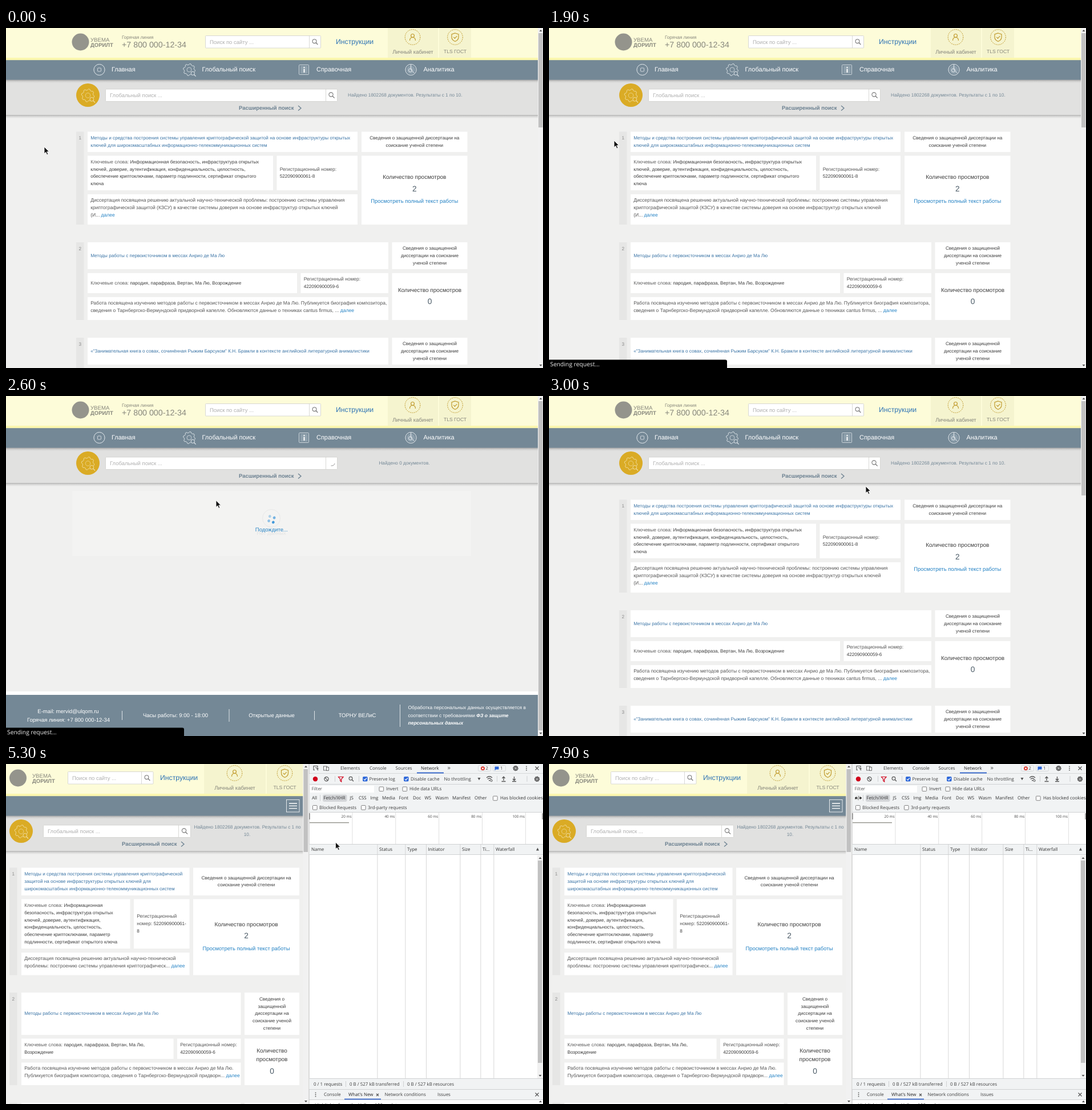
Recreate the animation shown at these times as an HTML page. Size 941x595 px, loop 8000 ms.

```html
<!DOCTYPE html>
<html lang="ru">
<head>
<meta charset="utf-8">
<title>Поиск</title>
<style>
html, body { margin: 0; width: 100%; height: 100%; overflow: hidden; background: #f0f0ef; }
svg { display: block; }
text { font-family: "Liberation Sans", Arial, sans-serif; white-space: pre; text-rendering: geometricPrecision; }
.mid { text-anchor: middle; }
.end { text-anchor: end; }
.bold { font-weight: bold; }
.slant { font-weight: bold; font-style: italic; }
.dev text { font-family: "Open Sans", "Noto Sans", sans-serif; }
</style>
</head>
<body>
<svg id="stage" width="941" height="595" viewBox="0 0 941 595"></svg>
<script>
const BLUE = '#2482c4', SLATE = '#748896', INK = '#3c3c3c', GREY = '#86867c', GOLD = '#c09a2c', BAR = '#f1f3f4', TAB = '#2b5fc9';
const PHONE = '+7 800 000-12-34';

const box = (x, y, x2, y2, fill, more = '') =>
  `<rect x="${x}" y="${y}" width="${x2 - x}" height="${y2 - y}" fill="${fill}" ${more}/>`;
const frame = (x, y, x2, y2, stroke, fill = 'none', r = 0) =>
  box(x + .5, y + .5, x2 - .5, y2 - .5, fill, `stroke="${stroke}" stroke-width=".8" rx="${r}"`);
const line = (d, stroke, width = 1, fill = 'none', more = '') =>
  `<path d="${d}" stroke="${stroke}" stroke-width="${width}" fill="${fill}" ${more}/>`;
const disc = (x, y, r, fill, more = '') => `<circle cx="${x}" cy="${y}" r="${r}" fill="${fill}" ${more}/>`;
const ring = (x, y, r, stroke, width = 1, more = '') =>
  disc(x, y, r, 'none', `stroke="${stroke}" stroke-width="${width}" ${more}`);
// y is the middle of the line of text
const text = (x, y, s, size = 8.17, fill = INK, cls = '') =>
  `<text x="${x}" y="${(y + size * .32).toFixed(2)}" font-size="${size}" fill="${fill}" class="${cls}">${s}</text>`;
const span = (s, fill, size = 8.3) => `<tspan fill="${fill}" font-size="${size}">${s}</tspan>`;
const group = (id, body, more = '') => `<g id="${id}" ${more}>${body}</g>`;

const lens = (x, y, r, color, width = 1.1) => ring(x, y, r, color, width) +
  line(`M${x + r * .7} ${y + r * .7}l${r} ${r}`, color, width * 1.2);
const cog = (x, y, r, color, teeth = 8, width = 1) => {
  let d = '';
  for (let i = 0; i < teeth * 4; i++) {
    const a = (i + .5) * Math.PI / teeth / 2, q = i % 4 < 2 ? r : r * .83;
    d += `${i ? 'L' : 'M'}${(x + q * Math.cos(a)).toFixed(1)} ${(y + q * Math.sin(a)).toFixed(1)}`;
  }
  return line(d + 'Z', color, width, 'none', 'stroke-linejoin="round"');
};
const cogLens = (x, y, r, color, back) => cog(x, y, r, color, 8, .9) + ring(x, y, r * .38, color, .7) +
  disc(x + r * .6, y + r * .6, r * .38, back) + lens(x + r * .6, y + r * .6, r * .3, color, 1);

function searchField(x, split, x2, y, hint) {
  return frame(x, y, x2, y + 22.5, '#d0d0cc', '#fff', 1) + box(split, y, split + .8, y + 22, '#d0d0cc') +
    text(x + 8, y + 11.5, hint, 9.5, '#b0b0b0');
}

function header(p) {
  const [ax, tx] = [p.account[2], p.tls[2]];
  return box(0, 0, p.w, 595, '#f0f0ef') + box(0, 0, p.w, 53, '#fdfcd9') + box(0, 52, p.w, 57, '#fbf7ae') +
    disc(p.logo, 24.5, 15, '#94948c') +
    text(p.name, 20.5, 'УВЕМА', 9.6, GREY) + text(p.name, 30, 'ДОРИЛТ', 9.5, GREY, 'bold') +
    searchField(p.site[0], p.site[1], p.site[2], 13, 'Поиск по сайту ...') +
    lens(p.site[1] + 9.5, 23.2, 3.4, '#777') +
    text(p.help, 24, 'Инструкции', 12.25, '#2f74b5') +
    box(p.account[0], 0, p.account[1], 52, '#f5f4cf') + box(p.tls[0], 0, p.tls[1], 52, '#f5f4cf') +
    [ax, tx].map(x => ring(x, 16, 13.3, GOLD, 1, 'stroke-dasharray="2 1.3"')).join('') +
    ring(ax, 13.4, 2.9, GOLD, 1.2) + line(`M${ax - 5} 22q0-5.5 5-5.5t5 5.5`, GOLD, 1.2) +
    line(`M${tx} 9l6 2v5q0 5-6 7.5q-6-2.5-6-7.5v-5zM${tx - 2.8} 15.8l2.2 2.3 3.8-4`, GOLD, 1.2) +
    text(ax + .5, 41.7, 'Личный кабинет', 9.5, GREY, 'mid') + text(tx, 41.5, 'TLS ГОСТ', 8.6, GREY, 'mid') +
    box(0, 90.5, p.w, 152.3, '#e1e1e0') + box(0, 56.2, p.w, 90.7, SLATE) +
    box(0, 90.7, p.w, 96, 'url(#shade)') + box(0, 152.3, p.w, 158.5, 'url(#shade)') +
    disc(p.badge, 117.5, 20.5, '#daab25') + cogLens(p.badge, 118, 11.3, '#f2dfa4', '#daab25') +
    searchField(p.find[0], p.find[1], p.find[2], 106.5, 'Глобальный поиск ...') +
    text(p.more, 140.3, 'Расширенный поиск', 9.45, '#6b8090', 'bold') +
    line(`M${p.more + 104} 136l5 4.3-5 4.3`, '#6b8090', 1.3);
}

const scrollbar = (x, y, y2, from, to) => box(x, y, x + 9.5, y2, '#f1f1f1') + box(x + 1, from, x + 8.5, to, '#c1c1c1') +
  line(`M${x + 2.5} ${y + 6}l2.5-3 2.5 3zM${x + 2.5} ${y2 - 6}l2.5 3 2.5-3z`, 'none', 0, '#505050');

// Text block centred vertically in a white card
function card(x, y, x2, y2, lines, { fill = INK, mid = false, dy = 0, size } = {}) {
  const top = (y + y2) / 2 + dy - .3 - (lines.length - 1) * 6.4;
  return box(x, y, x2, y2, '#fff') + lines.map((s, i) =>
    text(mid ? (x + x2) / 2 : x + 5.2, top + i * 12.8, s, size, fill, mid ? 'mid' : '')).join('');
}
const title = (x, y, x2, y2, lines) => card(x, y, x2, y2, lines, { fill: '#3973a5' });
const kind = (x, y, x2, y2, lines) => card(x, y, x2, y2, lines, { mid: true });
const summary = (x, y, x2, y2, lines) => card(x, y, x2, y2, lines, { dy: -2.8, size: 8.53, fill: '#555' });
const index = (x, y, y2, n) => box(x, y, x + 13.5, y2, '#e6e6e5') + text(x + 6.8, y + 11, n, 8.2, '#888', 'mid');
function views(x, y, x2, y2, rows) {
  const c = (x + x2) / 2;
  return box(x, y, x2, y2, '#fff') + rows.map(([dy, s, size, fill]) =>
    text(c, (y + y2) / 2 + dy, s, size, fill, 'mid')).join('');
}
const label = s => span(s, '#5c5c5c');
const regLabel = s => span(s, '#555', 8.5);
const more = span('далее', BLUE, 8.53);
const keys = label('Ключевые слова: ');
const viewRows = [[-22.7, 'Количество просмотров', 10, INK], [-2, '2', 13.7, '#4a5a66'],
  [19.5, 'Просмотреть полный текст работы', 9.45, BLUE]];

const wideHead = header({
  w: 932, logo: 130.5, name: 148, site: [349, 531, 552], help: 578, account: [669, 757, 712.5],
  tls: [759, 815, 787], badge: 143.5, find: [174, 560, 581], more: 408
}) + text(203, 16.5, 'Горячая линия', 8.15, GREY) + text(203, 29.5, PHONE, 14.25, GREY) +
  ring(163.5, 73, 9.6, '#e3e9ed') + frame(160, 69.5, 167, 76.5, '#e3e9ed', 'none', 1) +
  cogLens(321, 73, 10.5, '#e3e9ed', SLATE) +
  frame(513, 64, 531, 82, '#e3e9ed', 'none', 1) + box(516, 66.5, 528.5, 79.5, '#8fa1ad') +
  box(521.5, 71.5, 523.5, 78, '#fff') + box(521.5, 68, 523.5, 70, '#fff') +
  ring(709.5, 73, 9.6, '#e3e9ed') + disc(709.5, 73, 7.3, '#8d9fac') + line('M709.5 64v9l6 6', '#e3e9ed') +
  ring(708.5, 74, 3, '#e3e9ed') +
  [[185, 'Главная'], [343.5, 'Глобальный поиск'], [544, 'Справочная'], [731.5, 'Аналитика']]
    .map(([x, s]) => text(x, 72.7, s, 10.95, '#fff')).join('');

const wideResults = text(599, 117, 'Найдено 1802268 документов. Результаты с 1 по 10.', 8.23, SLATE) +
  lens(569.5, 116.5, 3.6, '#777') + scrollbar(932, 0, 595, 9, 174) +
  index(123, 181.5, 344, 1) +
  title(143, 181.5, 616, 217, ['Методы и средства построения системы управления криптографической защитой на основе инфраструктуры открытых',
    'ключей для широкомасштабных информационно-телекоммуникационных систем']) +
  kind(623, 181.5, 808.5, 217, ['Сведения о защищенной диссертации на', 'соискание ученой степени']) +
  card(143, 223.5, 468, 284, [keys + 'Информационная безопасность, инфраструктура открытых',
    'ключей, доверие, аутентификация, конфиденциальность, целостность,',
    'обеспечение криптоключами, параметр подлинности, сертификат открытого', 'ключа']) +
  card(474.5, 223.5, 616, 284, [regLabel('Регистрационный номер:'), '522090900061-8']) +
  views(623, 223.5, 808.5, 344, viewRows) +
  summary(143, 291, 616, 344, ['Диссертация посвящена решению актуальной научно-технической проблемы: построению системы управления',
    'криптографической защитой (КЗСУ) в качестве системы доверия на основе инфраструктур открытых ключей',
    '(И... ' + more]) +
  index(123, 375, 511, 2) +
  title(143, 375, 670, 422, ['Методы работы с первоисточником в мессах Анрио де Ма Лю']) +
  kind(676.5, 375, 808.5, 422, ['Сведения о защищенной', 'диссертации на соискание', 'ученой степени']) +
  card(143, 429, 510, 464, [keys + 'пародия, парафраза, Вертан, Ма Лю, Возрождение']) +
  card(516.5, 429, 670, 464, [regLabel('Регистрационный номер:'), '422090900059-6']) +
  views(676.5, 429, 808.5, 511, [[-11.5, 'Количество просмотров', 10, INK], [9, '0', 13.7, '#4a5a66']]) +
  summary(143, 471, 670, 511, ['Работа посвящена изучению методов работы с первоисточником в мессах Анрио де Ма Лю. Публикуется биография композитора,',
    'сведения о Тарнбергско-Вермундской придворной капелле. Обновляются данные о техниках cantus firmus, ... ' + more]) +
  index(123, 542, 595, 3) +
  title(143, 542, 670, 589, ['«"Занимательная книга о совах, сочинённая Рыжим Барсуком" К.Н. Брамли в контексте английской литературной анималистики']) +
  kind(676.5, 542, 808.5, 589, ['Сведения о защищенной', 'диссертации на соискание', 'ученой степени']);

const dots = [[6, 0, .9], [0, 5.5, .5], [-6, 0, .35], [0, -5.5, .65]]
  .map(([x, y, o]) => disc(x, y, 2.4, '#2f8fd8', `opacity="${o}"`)).join('');
const waiting = text(698, 117, 'Найдено 0 документов.', 8.2, SLATE, 'mid') + scrollbar(932, 0, 595, 9, 585) +
  line('M576 118q-1 4.5-6.5 4', '#999') +
  box(116, 166, 815, 280, '#f3f3f2') + ring(465, 214, 15.5, '#e8e8e8') +
  text(465, 240, 'Нет данных', 9.5, '#e4e4e4', 'mid') + group('spinner', dots) +
  text(465.3, 234, 'Подождите...', 9.45, BLUE, 'mid') +
  box(0, 517, 932, 523, '#fff') + box(0, 523, 932, 595, SLATE) +
  [[109, 551.5, 'E-mail: mervid@ulqom.ru'], [109.5, 566.5, 'Горячая линия: ' + PHONE], [297, 559, 'Часы работы: 9:00 - 18:00'],
    [465.5, 559, 'Открытые данные'], [615.5, 559, 'ТОРНУ ВЕЛиС']].map(([x, y, s]) => text(x, y, s, 9.5, '#fff', 'mid')).join('') +
  line('M203.5 551v16M391 548v22M540.5 551v16M690.5 540v39', '#dde3e7') +
  text(704.5, 545.3, 'Обработка персональных данных осуществляется в', 8.47, '#fff') +
  text(704.5, 558.8, 'соответствии с требованиями <tspan class="slant">ФЗ о защите</tspan>', 8.47, '#fff') +
  text(704.5, 572, 'персональных данных', 8.47, '#fff', 'slant');

const narrow = header({
  w: 520.5, logo: 21, name: 46, site: [108, 237, 258.5], help: 270, account: [347, 455, 400.5],
  tls: [457, 520.5, 488.5], badge: 26.5, find: [65, 302, 324], more: 203
}) + lens(312, 116.5, 3.6, '#777') + frame(491, 62, 514.5, 84.5, '#fff') +
  line('M496 69h14M496 73.3h14M496 77.6h14', '#fff', 1.3) +
  text(423, 110.5, 'Найдено 1802268 документов. Результаты с 1 по', 8.23, SLATE, 'mid') + text(422.5, 123, '10.', 8.23, SLATE, 'mid') +
  index(6, 181.5, 369.5, 1) +
  title(27, 181.5, 321.5, 230, ['Методы и средства построения системы управления криптографической',
    'защитой на основе инфраструктуры открытых ключей для', 'широкомасштабных информационно-телекоммуникационных систем']) +
  kind(328, 181.5, 514, 230, ['Сведения о защищенной диссертации на', 'соискание ученой степени']) +
  card(27, 236.5, 217.5, 323, [keys + 'Информационная', 'безопасность, инфраструктура открытых', 'ключей, доверие, аутентификация,',
    'конфиденциальность, целостность,', 'обеспечение криптоключами, параметр', 'подлинности, сертификат открытого ключа']) +
  card(224, 236.5, 321.5, 323, [regLabel('Регистрационный'), regLabel('номер: ') + '522090900061-', '8']) +
  views(328, 236.5, 514, 369.5, viewRows) +
  summary(27, 330, 321.5, 369.5, ['Диссертация посвящена решению актуальной научно-технической', 'проблемы: построению системы управления криптографическ... ' + more]) +
  index(6, 400, 562, 2) +
  title(27, 400, 411.5, 474, ['Методы работы с первоисточником в мессах Анрио де Ма Лю']) +
  kind(418, 400, 514, 474, ['Сведения о', 'защищенной', 'диссертации на', 'соискание ученой', 'степени']) +
  card(27, 480.5, 293.5, 516, [keys + 'пародия, парафраза, Вертан, Ма Лю,', 'Возрождение']) +
  card(300, 480.5, 411.5, 516, [regLabel('Регистрационный номер:'), '422090900059-6']) +
  views(418, 480.5, 514, 562, [[-19.5, 'Количество', 10, INK], [-4.5, 'просмотров', 10, INK], [16.5, '0', 13.7, '#4a5a66']]) +
  summary(27, 522.5, 411.5, 562, ['Работа посвящена изучению методов работы с первоисточником в мессах Анрио де Ма Лю.',
    'Публикуется биография композитора, сведения о Тарнбергско-Вермундской придворн... ' + more]) +
  box(6, 593, 19.5, 595, '#e6e6e5') + box(27, 593, 411.5, 595, '#fff') + box(418, 593, 514, 595, '#fff') +
  scrollbar(520.5, 0, 595, 9, 154);

const dev = (x, y, s, fill = '#3c3c3c', size = 7.95, cls = '') => text(x, y, s, size, fill, cls);
const row = (y, items, fill) => items.map(([x, s]) => dev(x, y, s, fill)).join('');
const kebab = (x, y) => [-3.2, 0, 3.2].map(d => disc(x, y + d, .9, '#555')).join('');
const cross = (x, y, r = 3, color = '#555') => line(`M${x - r} ${y - r}l${2 * r} ${2 * r}m0-${2 * r}l-${2 * r} ${2 * r}`, color, 1.2);
const gear = (x, y) => cog(x, y, 4, '#555', 8, 1.5) + ring(x, y, 1.8, '#555', 1.3);
const check = (x, y, on) => frame(x, y - 4.3, x + 8.6, y + 4.3, on ? '#2b66d9' : '#666', on ? '#2b66d9' : '#fff', 1) +
  (on ? line(`M${x + 2} ${y}l1.8 2 3-4`, '#fff', 1.2) : '');

const devBase = box(530.5, 0, 941, 595, '#fff') + box(531, 0, 941, 16.5, BAR) + box(531, 16, 941, 16.8, '#cfd1d3') +
  line('M541 10.5h-2v-7h7v3M542 6l5 2-2 1 2 2', '#555', 1.1) +
  frame(556, 3.5, 563, 11.5, '#555') + frame(561, 5, 566, 12, '#555', BAR) +
  row(7.3, [[586, 'Elements'], [637, 'Console'], [682.5, 'Sources']]) + gear(893, 7.5) + kebab(912, 7.5) + cross(930.5, 7.5) +
  box(531, 569.5, 941, 587.5, BAR) + line('M531 569.5h410M531 587.5h410', '#cfd1d3') +
  kebab(542.5, 578.5) + row(578.5, [[557, 'Console'], [663.5, 'Network conditions'], [756, 'Issues']]) +
  dev(600, 578.5, "What's New", '#222') + cross(651, 579, 2) + box(593, 585.7, 657, 587.3, TAB) + cross(930.5, 578.5) +
  dev(541, 597.5, 'Highlights from the Vellum 100 update', '#333', 8.3) +
  line('M934 592l2.5-3 2.5 3z', 'none', 0, '#505050') + box(530.5, 0, 531.5, 595, '#bbb');
const earlyTabs = dev(727, 7.3, 'Performance insights') + line('M811 4h4m-3 0v3l-2 4h6l-2-4v-3', '#555') +
  dev(838, 7.3, 'Network', '#222') + box(831, 14.6, 879, 16.4, TAB);
const lateTabs = dev(727, 7.3, 'Network', '#222') + box(720, 14.6, 767, 16.4, TAB) + dev(773.5, 6.5, '»', '#555', 11) +
  frame(827, 2, 850, 13, '#d0d3d6', BAR, 2) + disc(835.5, 7.7, 3.4, '#d93025') + cross(835.5, 7.7, 1.3, '#fff') + dev(840.5, 7.6, '2', '#444', 7.6) +
  frame(853, 2, 876, 13, '#d0d3d6', BAR, 2) + line('M856.5 4.5h7v5h-5l-2 2z', 'none', 0, '#2b66d9') + dev(866, 7.6, '1', '#444', 7.6);

const toolbars = box(531.5, 17, 941, 85, BAR) + line('M531.5 35.5h409.5M531.5 84.5h409.5', '#cfd1d3') +
  line('M576.5 21v10M618.5 21v10M860.5 21v10M913 21v10M550.5 54v11', '#cfd1d3') +
  disc(542, 26.3, 4.2, '#d0021b') + ring(561.5, 26.3, 3.6, '#555', 1.2) + line('M559 23.8l5 5', '#555', 1.2) +
  line('M582.5 22.5h8.5l-3.3 4v4.5l-2-1.5v-3z', '#d0021b', 1.2) + lens(604, 25.3, 2.9, '#555') +
  check(625, 26.3, true) + check(697, 26.3, true) +
  row(26.3, [[636.5, 'Preserve log'], [709, 'Disable cache'], [767.5, 'No throttling']]) +
  line('M826.5 24h5l-2.5 4.5z', 'none', 0, '#555') +
  line('M872 29v-6.5m-2.5 2.5l2.5-2.7 2.5 2.7M868.5 30.5h7M890.5 22v6.5m-2.5-2.5l2.5 2.7 2.5-2.7M887 30.5h7', '#555', 1.3) +
  gear(930.5, 26.3) +
  box(533, 38, 645, 50, '#fff') + dev(535.5, 43.8, 'Filter', '#555') +
  check(653.5, 43.8) + check(694.5, 43.8) + row(43.8, [[666, 'Invert'], [707, 'Hide data URLs']]) +
  box(555, 53.5, 597.5, 66, '#d3d5d8', 'rx="3"') +
  row(59.8, [[536, 'All'], [556.5, 'Fetch/XHR'], [602.5, 'JS'], [618, 'CSS'], [638.5, 'Img'], [659, 'Media'], [688.5, 'Font'],
    [713, 'Doc'], [733.5, 'WS'], [752.5, 'Wasm'], [782, 'Manifest'], [821, 'Other'], [866, 'Has blocked cookies']], '#333') +
  check(853, 60) + check(537, 76.3) + check(622, 76.3) + row(76.3, [[549, 'Blocked Requests'], [634, '3rd-party requests']]);
const wifi = line('M842 24q5-4.5 10 0M843.8 26.5q3.2-3 6.4 0', '#555', 1.2) + disc(847, 28.8, 1, '#555') + ring(850.5, 29, 1.7, '#555');

const columns = [[535, 'Name'], [654, 'Status'], [703, 'Type'], [739.5, 'Initiator'], [799, 'Size'], [835, 'Ti…'], [858, 'Waterfall']];
const table = [0, 1, 2, 3, 4].map(i => box(606.5 + i * 75.9, 85, 607.3 + i * 75.9, 140, '#d8d8d8') +
    dev(605.5 + i * 75.9, 91.5, (i + 1) * 20 + ' ms', '#444', 6.4, 'end')).join('') +
  box(531.5, 86, 532.5, 97, '#555') + box(939.5, 86, 940.5, 97, '#555') + box(532, 102, 601, 103.3, '#8d8d85') +
  box(531.5, 140, 941, 159, BAR) + line('M531.5 140.5h409.5M531.5 158.5h409.5', '#cfd1d3') + row(149.3, columns, '#333') +
  columns.slice(1).map(([x]) => box(x - 3.5, 140, x - 2.7, 550, '#cdcdcd')).join('') +
  line('M929 151.5h5l-2.5-5z', 'none', 0, '#555') + scrollbar(931, 160, 550, 169, 523) +
  box(531.5, 550, 941, 569.5, BAR) + line('M531.5 550.5h409.5M531.5 569.5h409.5M595.5 555v10M696.5 555v10', '#cfd1d3') +
  row(560, [[539, '0 / 1 requests'], [602, '0 B / 527 kB transferred'], [703, '0 B / 527 kB resources']]);

const stage = document.getElementById('stage');
const shade = '<defs><linearGradient id="shade" x2="0" y2="1"><stop stop-opacity=".28"/>' +
  '<stop offset=".4" stop-opacity=".1"/><stop offset="1" stop-opacity="0"/></linearGradient></defs>';
stage.innerHTML = shade + group('wideHead', wideHead) + group('results', wideResults) + group('waiting', waiting) +
  group('narrow', narrow) +
  group('tools', group('devBase', devBase) + group('earlyTabs', earlyTabs) + group('lateTabs', lateTabs) +
    group('toolbars', toolbars) + group('wifi', wifi) + group('table', table), 'class="dev"') +
  group('status', line('M0 580.5h309q3 0 3 3v11.5h-312z', 'none', 0, '#000') + text(2, 588.3, 'Sending request…', 10.35, '#eee'), 'class="dev"') +
  group('arrow', line('M0 0v11.8l2.8-2.5 2 4.4 2-.9-2-4.3h3.7z', '#fff', .8, '#111')) +
  group('resize', line('M-6.5 0l3.5-3.2v2.2h6v-2.2l3.5 3.2-3.5 3.2v-2.2h-6v2.2zM-.7-4h1.4v8h-1.4z', '#fff', .7, '#111'));

const path = [[0, 67, 208], [1500, 67, 208], [1900, 114, 197], [2100, 165, 193], [2400, 264, 194], [2700, 420, 177],
  [3000, 555, 158], [4900, 555, 158], [5100, 548, 151], [5200, 548, 151], [5600, 666, 95], [5700, 666, 95], [6000, 728, 50],
  [6200, 690, 40], [6500, 628, 72], [6600, 579, 71], [6700, 571, 70], [6800, 571, 69], [7000, 570, 57], [7300, 570, 57],
  [7400, 652, 77], [7600, 652, 77], [7700, 610, 64], [7800, 565, 58], [7900, 542, 59.5], [8000, 542, 59.5]];
function pointAt(t) {
  const i = path.findIndex(p => p[0] > t), [t0, x0, y0] = path[i - 1], [t1, x1, y1] = path[i], k = (t - t0) / (t1 - t0);
  return `translate(${x0 + (x1 - x0) * k} ${y0 + (y1 - y0) * k})`;
}

const spans = {
  wideHead: [0, 4400], waiting: [2100, 2700], status: [1100, 2700], narrow: [4400, 8000], tools: [4400, 8000],
  earlyTabs: [4400, 5000], lateTabs: [5000, 8000], toolbars: [4500, 8000], wifi: [4800, 8000], table: [5000, 8000],
  arrow: [0, 7900], resize: [7900, 8000]
};
const byId = id => document.getElementById(id);
const show = (id, on) => byId(id).style.display = on ? '' : 'none';

function draw() {
  const t = Math.floor(performance.now() % 8000 / 100) * 100;
  for (const id in spans) show(id, t >= spans[id][0] && t < spans[id][1]);
  show('results', t < 2100 || t >= 2700 && t < 4400);
  byId('arrow').setAttribute('transform', pointAt(t));
  byId('resize').setAttribute('transform', pointAt(t));
  byId('spinner').setAttribute('transform', `translate(465.3 215.8) rotate(${(t - 2400) * .3})`);
  requestAnimationFrame(draw);
}
draw();
</script>
</body>
</html>
```
